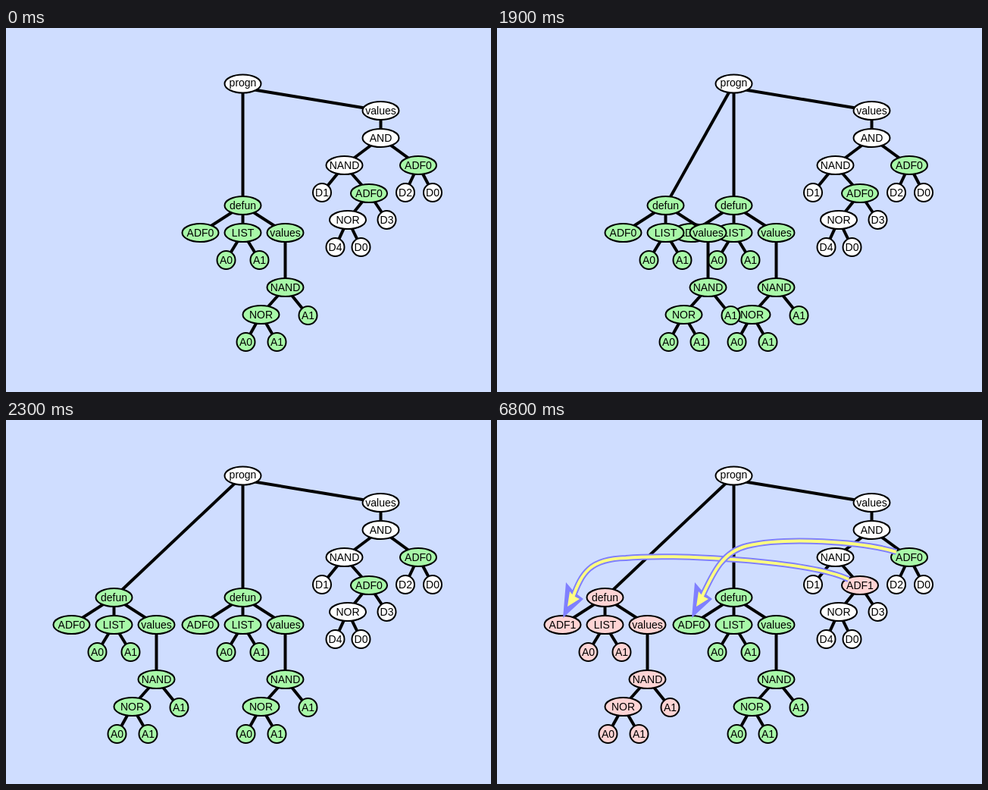
An HTML page that plays this animation: 640x480 px, repeating every 8 s.

```html
<!DOCTYPE html>
<html lang="en">
<head>
<meta charset="utf-8">
<title>Function tree duplication</title>
<style>
  html, body { margin: 0; height: 100%; overflow: hidden; background: #cfddff; }
  svg { display: block; width: 100vw; height: 100vh; }
  line { stroke: #000; stroke-width: 4; }
  ellipse { stroke: #000; stroke-width: 2; }
  text { font: 14px "Liberation Sans", Arial, sans-serif; text-anchor: middle; }
  .shaft { fill: none; stroke: #8080ff; stroke-width: 8; }
  .core { fill: none; stroke: #ffff80; stroke-width: 4; }
</style>
</head>
<body>
<svg viewBox="0 0 640 480"></svg>
<script>
const GREEN = '#a8f8a8', PINK = '#ffd4d4', WHITE = '#fff';
const svg = document.querySelector('svg');

function add(parent, tag, attrs = {}) {
  const el = document.createElementNS('http://www.w3.org/2000/svg', tag);
  for (const key in attrs) el.setAttribute(key, attrs[key]);
  return parent.appendChild(el);
}

function edge(parent, x1, y1, x2, y2) {
  return add(parent, 'line', { x1, y1, x2, y2 });
}

function node(parent, label, cx, cy, fill, drop = 5) {
  const shape = add(parent, 'ellipse', { cx, cy, rx: label.length > 2 ? 24 : 12, ry: 12, fill });
  const text = add(parent, 'text', { x: cx, y: cy + drop });
  text.textContent = label;
  return { shape, text };
}

// Each row: label, x, y, index of the parent row
function tree(parent, rows, color) {
  rows.forEach(([, x, y, up]) => {
    if (up >= 0) edge(parent, rows[up][1], rows[up][2], x, y);
  });
  return rows.map(([label, x, y]) => node(parent, label, x, y, color(label)));
}

const root = [312.5, 73.5];
const mainRows = [
  ['values', 494.5, 109, -1], ['AND', 494.5, 145, 0],
  ['NAND', 446.5, 181, 1], ['ADF0', 544, 181, 1],
  ['D1', 417, 217, 2], ['ADF0', 479, 218, 2],
  ['D2', 527, 217, 3], ['D0', 563, 217, 3],
  ['NOR', 451, 253, 5], ['D3', 502.5, 253, 5],
  ['D4', 434.5, 289, 8], ['D0', 468.5, 289, 8]
];
const defRows = [
  ['defun', 312.5, 234, -1], ['ADF0', 256.5, 270, 0],
  ['LIST', 312.5, 270, 0], ['values', 368.5, 270, 0],
  ['A0', 290.5, 306, 2], ['A1', 334.5, 306, 2],
  ['NAND', 368.5, 342, 3], ['NOR', 336.5, 378, 6],
  ['A1', 398.5, 379, 6], ['A0', 316.5, 414, 7], ['A1', 357.5, 414, 7]
];

edge(svg, 312.5, 79, 494.5, 109);
edge(svg, ...root, 312.5, 234);
const link = edge(svg, ...root, 312.5, 234);
const mainNodes = tree(svg, mainRows, s => s === 'ADF0' ? GREEN : WHITE);
tree(svg, defRows, () => GREEN);
const copy = add(svg, 'g');
const copyNodes = tree(copy, defRows, () => GREEN);
node(svg, 'progn', ...root, WHITE, 3.5);

const arrows = add(svg, 'g');
function arrow(d, dx) {
  const head = { transform: `translate(${dx})` };
  add(arrows, 'path', { d, class: 'shaft' });
  add(arrows, 'path', { ...head, d: 'M87 261L91 214L102 227L114 236Z', fill: '#8080ff' });
  add(arrows, 'path', { d, class: 'core' });
  add(arrows, 'path', { ...head, d: 'M93 246L96 226L101 232L109 236Z', fill: '#ffff80' });
}
arrow('M464 210C410 185 230 176 170 182C122 183 112 202 100 234', 0);
arrow('M527 174C480 160 380 154 330 166C296 174 284 205 270 234', 170);

function rename(item, on) {
  item.shape.setAttribute('fill', on ? PINK : GREEN);
  item.text.textContent = on ? 'ADF1' : 'ADF0';
}

function show(el, on) {
  el.setAttribute('visibility', on ? 'visible' : 'hidden');
}

function draw(now) {
  const t = now % 8000;
  const step = Math.min(17, Math.max(0, Math.floor((t - 1500) / 50) + 1));
  const shift = -10 * step;
  show(copy, step > 0);
  show(link, step > 0);
  copy.setAttribute('transform', `translate(${shift})`);
  link.setAttribute('x2', 312.5 + shift);
  const renamed = t >= 3800;
  copyNodes.forEach(n => n.shape.setAttribute('fill', renamed ? PINK : GREEN));
  rename(copyNodes[1], renamed);
  rename(mainNodes[5], t >= 5300);
  show(arrows, t >= 6800);
}

const start = performance.now();
function tick() {
  draw(performance.now() - start);
  requestAnimationFrame(tick);
}
tick();
</script>
</body>
</html>
```
